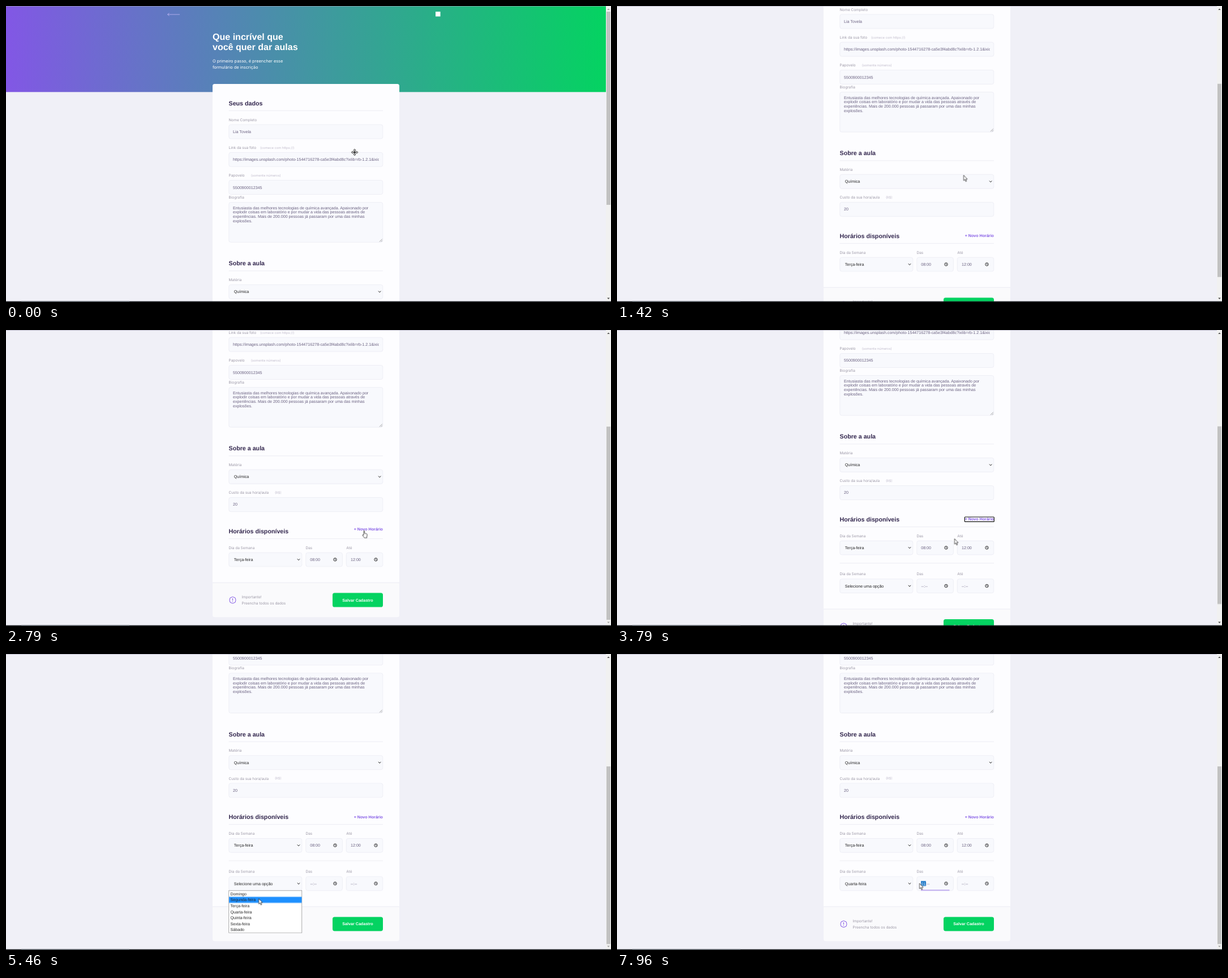
These frames come from a looping animation (1069 by 524 pixels, 8000 ms). An HTML page:

```html
<!DOCTYPE html>
<html lang="pt-BR">
<head>
<meta charset="utf-8">
<title>Formulário de inscrição</title>
<style>
html, body { margin: 0; width: 100%; height: 100%; overflow: hidden; background: #f0f0f7; }
body > svg { display: block; width: 100vw; height: 100vh; }
text { font: 7.13px "Liberation Sans", Arial, sans-serif; fill: #6a6180; text-rendering: geometricPrecision; white-space: pre; }
.h1 { font-size: 16.05px; font-weight: 700; fill: #fff; }
.lead { font: 7.38px Inter, sans-serif; fill: #fff; }
.h2 { font-size: 10.7px; font-weight: 700; fill: #32264d; }
.label { font: 6.47px Inter, sans-serif; fill: #9c98a6; }
.hint { font: 5.75px Inter, sans-serif; fill: #c1bccc; }
.pick { fill: #222; }
.bold { font-weight: 700; }
.field { fill: #f8f9fd; stroke: #e6e6f0; stroke-width: .6; }
.rule { stroke: #e6e6f0; stroke-width: .7; }
.line { fill: none; stroke: #222; stroke-width: 1; }
.card { fill: #fdfdff; }
.cursor path { fill: #fff; stroke: #222; stroke-width: .8; stroke-linejoin: round; }
.cursor .thin { fill: none; }

/* every track shares one 8 s clock */
.smooth { animation: 8s linear infinite; }
.step { animation: 8s step-end infinite; }

.page { animation-name: scroll; }
@keyframes scroll {
  0%, 12.4% { transform: translateY(0); }
  12.5% { transform: translateY(-13px); }
  17.75% { transform: translateY(-195px); }
  21.375%, 45.2% { transform: translateY(-246.1px); }
  50% { transform: translateY(-292px); }
  55.2%, 100% { transform: translateY(-313.7px); }
}
.thumb { animation-name: thumb; }
@keyframes thumb {
  0%, 12.4% { transform: translateY(0); height: 342px; }
  12.5% { transform: translateY(8.3px); }
  17.75% { transform: translateY(127.6px); }
  21.375%, 38.09% { transform: translateY(161px); height: 342px; }
  38.1%, 45.2% { transform: translateY(148px); height: 314.5px; }
  50% { transform: translateY(175.7px); }
  55.2%, 100% { transform: translateY(189px); height: 314.5px; }
}
.up { animation-name: up; }
@keyframes up { 0% { fill: #a3a3a3; } 12.5%, 100% { fill: #505050; } }
.down { animation-name: down; }
@keyframes down { 0%, 38.1% { fill: #505050; } 21.375%, 55.2%, 100% { fill: #a3a3a3; } }

.added { animation-name: added; }
@keyframes added { 0% { opacity: 0; } 38.1%, 100% { opacity: 1; } }
.footer { animation-name: pushed; }
@keyframes pushed { 0% { transform: none; } 38.1%, 100% { transform: translateY(67.6px); } }
.link { animation-name: lift; }
@keyframes lift { 0%, 44%, 100% { transform: none; } 30% { transform: translateY(-3px); } }
.ring { animation-name: ring; }
@keyframes ring { 0%, 61%, 100% { opacity: 0; } 38.1% { opacity: 1; } }
.list { animation-name: list; }
@keyframes list { 0%, 75.5%, 100% { opacity: 0; } 61% { opacity: 1; } }
.hover { animation-name: hover; }
@keyframes hover {
  0% { transform: none; opacity: 0; }
  65% { transform: none; opacity: 1; }
  68% { transform: translateY(10.6px); opacity: 1; }
  71% { transform: translateY(21.2px); opacity: 1; }
  73%, 100% { transform: translateY(31.8px); opacity: 1; }
}
.unset { animation-name: unset-day; }
@keyframes unset-day { 0% { opacity: 1; } 75.5%, 100% { opacity: 0; } }
.set { animation-name: set-day; }
@keyframes set-day { 0% { opacity: 0; } 75.5%, 100% { opacity: 1; } }
.focus { animation-name: focus; }
@keyframes focus { 0% { opacity: 0; } 89%, 100% { opacity: 1; } }
.blank { animation-name: blank; }
@keyframes blank { 0% { opacity: 1; } 99.5%, 100% { opacity: 0; } }
.typed { animation-name: typed; }
@keyframes typed { 0% { opacity: 0; } 99.5%, 100% { opacity: 1; } }

.cursor { animation-name: move; }
@keyframes move {
  0%, 3% { transform: translate(616px, 259px); }
  11%, 12.5% { transform: translate(618px, 268.5px); }
  17.75%, 22.8% { transform: translate(612.5px, 299.5px); }
  31%, 44% { transform: translate(632px, 355.5px); }
  48% { transform: translate(590px, 372px); }
  55% { transform: translate(446px, 410px); }
  57.2%, 62% { transform: translate(443.5px, 412px); }
  67% { transform: translate(446px, 428px); }
  73.5% { transform: translate(449px, 454px); }
  76%, 82.8% { transform: translate(449.5px, 452px); }
  88.5%, 100% { transform: translate(534.5px, 406px); }
}
.pan { animation-name: pan; }
@keyframes pan { 0% { opacity: 1; } 5%, 100% { opacity: 0; } }
.beam { animation-name: beam; }
@keyframes beam { 0%, 16%, 100% { opacity: 0; } 5% { opacity: 1; } }
.arrow { animation-name: arrow; }
@keyframes arrow { 0%, 30% { opacity: 0; } 16%, 44%, 100% { opacity: 1; } }
.hand { animation-name: hand; }
@keyframes hand { 0%, 44%, 100% { opacity: 0; } 30% { opacity: 1; } }
</style>
</head>
<body>
<svg viewBox="0 0 1069 524" preserveAspectRatio="none">
  <defs>
    <linearGradient id="sky"><stop stop-color="#8257e5"/><stop offset="1" stop-color="#04d361"/></linearGradient>
    <rect id="wide" class="field" x="393.8" width="272" height="25" rx="3.4"/>
    <path id="rule" class="rule" d="M393.6 0H666"/>
    <path id="chevron" class="line" stroke-width="1.3" d="M-2.2-1.2L0 1.2 2.2-1.2"/>
    <g id="clock" class="line"><circle r="2.7"/><path d="M0-1.7V.2L1.3.9" stroke-width=".8"/></g>
    <g id="slot">
      <text class="label" x="393.5" y="633.7">Dia da Semana</text>
      <text class="label" x="529.5" y="633.7">Das</text>
      <text class="label" x="601.3" y="633.7">Até</text>
      <rect class="field" x="393.8" y="640.2" width="129" height="24.7" rx="3.4"/>
      <rect class="field" x="529.8" y="640.2" width="64.6" height="24.7" rx="3.4"/>
      <rect class="field" x="601.2" y="640.2" width="64.6" height="24.7" rx="3.4"/>
      <use href="#chevron" x="517" y="652.4"/>
      <use href="#clock" x="581.5" y="652.4"/>
      <use href="#clock" x="653.5" y="652.4"/>
    </g>
  </defs>

  <rect width="1069" height="524" fill="#f0f0f7"/>
  <g class="page smooth">
    <rect width="1060" height="152.3" fill="url(#sky)"/>
    <path d="M307 15H285.5M288.5 12.6L285.5 15 288.5 17.4" fill="none" stroke="#d4c2ff" stroke-width=".8" opacity=".85"/>
    <rect x="759" y="10" width="8.5" height="8.5" fill="#fff"/>
    <text class="h1" x="365" y="59.8">Que incrível que</text>
    <text class="h1" x="365" y="78.4">você quer dar aulas</text>
    <text class="lead" x="365" y="100.2">O primeiro passo, é preencher esse</text>
    <text class="lead" x="365" y="111.3">formulário de inscrição</text>

    <rect class="card" x="365" y="138" width="330" height="556" rx="3.6"/>
    <text class="h2" x="393.5" y="176.4">Seus dados</text>
    <use href="#rule" y="185.3"/>

    <text class="label" x="393.5" y="204.2">Nome Completo</text>
    <use href="#wide" y="210"/>
    <text x="401" y="224.8">Lia Tovela</text>

    <text class="label" x="393.5" y="253.3">Link da sua foto</text>
    <text class="hint" x="449" y="253">(comece com https://)</text>
    <use href="#wide" y="259.3"/>
    <svg x="401" y="259" width="258" height="26"><text y="15.2">https://images.unsplash.com/photo-1544716278-ca5e3f4abd8c?ixlib=rb-1.2.1&amp;ixid=</text></svg>

    <text class="label" x="393.5" y="302.3">Papovelo</text>
    <text class="hint" x="432.7" y="302">(somente números)</text>
    <use href="#wide" y="308.5"/>
    <text x="401" y="323.5">5500900012345</text>

    <text class="label" x="393.5" y="341">Biografia</text>
    <rect class="field" x="393.8" y="347.6" width="272" height="70.6" rx="3.4"/>
    <text x="401" y="359.6">Entusiasta das melhores tecnologias de química avançada. Apaixonado por</text>
    <text x="401" y="367.4">explodir coisas em laboratório e por mudar a vida das pessoas através de</text>
    <text x="401" y="375.2">experiências. Mais de 200.000 pessoas já passaram por uma das minhas</text>
    <text x="401" y="383">explosões.</text>
    <path d="M660 417.3L664.8 412.5M662.8 417.3L664.8 415.3" stroke="#777" stroke-width=".7"/>

    <text class="h2" x="393.5" y="459.4">Sobre a aula</text>
    <use href="#rule" y="468.9"/>
    <text class="label" x="393.5" y="487.2">Matéria</text>
    <use href="#wide" y="493.4"/>
    <text class="pick" x="402.8" y="508.3">Química</text>
    <use href="#chevron" x="660.2" y="505.8"/>
    <text class="label" x="393.5" y="536.3">Custo da sua hora/aula</text>
    <text class="hint" x="475" y="536">(R$)</text>
    <use href="#wide" y="542.6"/>
    <text x="401" y="557.3">20</text>

    <g class="footer step">
      <rect class="card" x="365" y="620" width="330" height="74"/>
      <path d="M365 693.4H695V750.7a3.6 3.6 0 0 1-3.6 3.6H368.6a3.6 3.6 0 0 1-3.6-3.6z" fill="#fafafc"/>
      <path class="rule" d="M365 693.4H695"/>
      <path d="M400.5 718.4L405 720.2 406 724.2 405 728.2 400.5 730 396 728.2 395 724.2 396 720.2z" fill="none" stroke="#8257e5" stroke-linejoin="round"/>
      <path d="M400.5 721V725M400.5 726.2V727.4" stroke="#8257e5"/>
      <text class="label" x="416.5" y="721.2">Importante!</text>
      <text class="label" x="416.5" y="731.8">Preencha todos os dados</text>
      <rect x="577" y="711.5" width="89" height="25" rx="3.6" fill="#04d361"/>
      <text class="bold" x="621.5" y="726.6" text-anchor="middle" style="fill:#fff">Salvar Cadastro</text>
    </g>

    <text class="h2" x="393.5" y="606">Horários disponíveis</text>
    <use href="#rule" y="615.5"/>
    <g class="link step">
      <text class="bold" x="614.7" y="604.4" style="fill:#8257e5">+ Novo Horário</text>
      <rect class="ring step" x="614.3" y="598" width="52" height="8.4" rx="1" fill="none" stroke="#101010" stroke-width="1.2"/>
    </g>

    <use href="#slot"/>
    <text class="pick" x="402.8" y="654.9">Terça-feira</text>
    <text x="537.2" y="654.9">08:00</text>
    <text x="609" y="654.9">12:00</text>

    <g class="added step">
      <use href="#rule" y="679.7"/>
      <use href="#slot" y="67.6"/>
      <text class="pick unset step" x="402.8" y="722.5">Selecione uma opção</text>
      <text class="pick set step" x="402.8" y="722.5">Quarta-feira</text>
      <text x="609" y="722.5">--:--</text>
      <g class="blank step">
        <text x="537.5" y="722.5">--:--</text>
        <g class="focus step">
          <rect x="537" y="715.7" width="5.6" height="8.6" fill="#0f70c4"/>
          <text x="537.5" y="722.5" style="fill:#fff">--</text>
        </g>
      </g>
      <g class="typed step">
        <rect x="537" y="715.7" width="8.8" height="8.6" fill="#0f70c4"/>
        <text x="537.4" y="722.5" style="fill:#fff">01</text>
        <text x="545.6" y="722.5">:--</text>
      </g>
      <path class="focus step" d="M537 731.9H587.5" stroke="#8257e5" stroke-width=".9"/>
    </g>

    <g class="list step">
      <rect x="393.8" y="732.6" width="129" height="75" fill="#fff" stroke="#767676" stroke-width=".6"/>
      <rect class="hover step" x="394.1" y="733" width="128.4" height="10.6" fill="#1e90ff"/>
      <g id="days"></g>
    </g>
  </g>

  <rect width="1069" height=".8" fill="#a5a3b8" opacity=".8"/>
  <rect x="1060" width="9" height="523" fill="#f1f1f1"/>
  <rect class="thumb smooth" x="1061" y="10" width="7" height="342" fill="#c1c1c1"/>
  <path class="up step" d="M1062.2 7L1064.5 4.4 1066.8 7z"/>
  <path class="down step" d="M1062.2 516.6L1064.5 519.2 1066.8 516.6z"/>
  <rect y="522.7" width="1069" height="1.3" fill="#15191d"/>
  <rect x="27" y="522.7" width="191" height="1.3" fill="#4d555c"/>

  <g class="cursor smooth">
    <g class="pan step">
      <path d="M0-6L2-3.6H.8V-.8H3.6V-2L6 0 3.6 2V.8H.8V3.6H2L0 6-2 3.6H-.8V.8H-3.6V2L-6 0-3.6-2V-.8H-.8V-3.6H-2z"/>
      <circle r="1.3" fill="#222"/>
    </g>
    <path class="beam step thin" d="M-1.8-4.6H-.5L0-4.2 .5-4.6H1.8M0-4.2V4.2M-1.8 4.6H-.5L0 4.2 .5 4.6H1.8"/>
    <path class="arrow step" d="M0 0V9.6L2.1 7.6 3.7 11.2 5.2 10.5 3.7 7H6.5z"/>
    <path class="hand step" d="M0 .6C0-.5 1.7-.5 1.7.6V4.6L5 5.2C6 5.4 6.3 6 6.2 6.9L5.7 10.2V12.3H1.2L-1.9 8.3C-2.6 7.2-1.5 6.6-.8 7.2L0 8z"/>
  </g>
</svg>
<script>
const names = ["Domingo", "Segunda-feira", "Terça-feira", "Quarta-feira", "Quinta-feira", "Sexta-feira", "Sábado"];
document.getElementById("days").innerHTML = names
  .map((name, i) => `<text class="pick" x="396.5" y="${740.8 + i * 10.6}">${name}</text>`)
  .join("");
</script>
</body>
</html>
```
